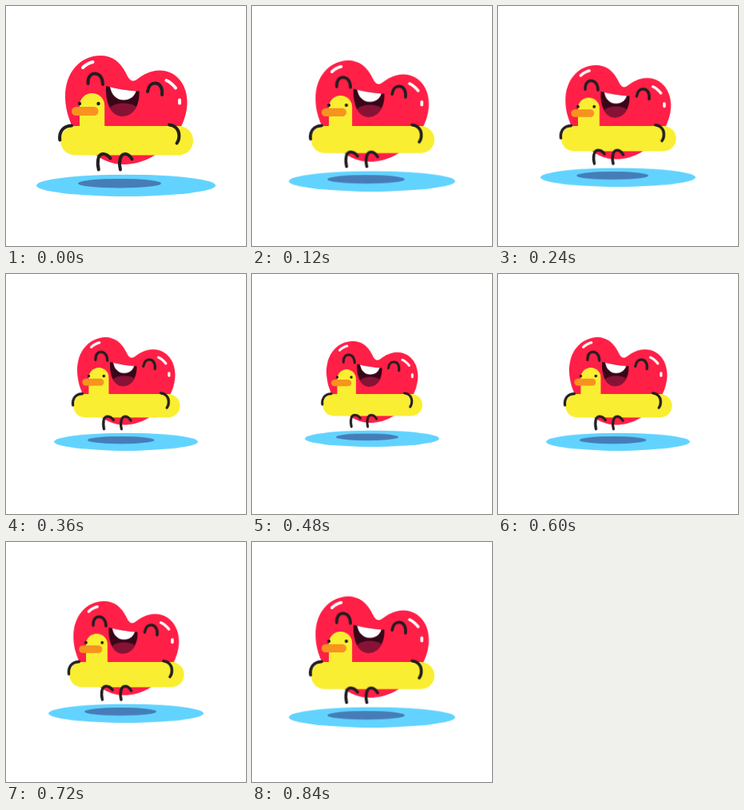
Animation, 300 px wide and 300 px high, one loop 960 ms. Source, as an HTML page without scripts:

```html
<!DOCTYPE html>
<html lang="en">
<head>
<meta charset="utf-8">
<title>Floating heart</title>
<style>
  html, body { margin: 0; width: 100%; height: 100%; overflow: hidden; background: #fff; }
  svg { display: block; width: 100%; height: 100%; }
  .line { fill: none; stroke: #231f20; stroke-width: 4; stroke-linecap: round; stroke-linejoin: round; }
  .shine { fill: none; stroke: #fff; stroke-width: 4; stroke-linecap: round; }

  /* Shrinks and grows about the stage centre in hard steps */
  .scene { transform-origin: 150px 150px; animation: pulse 960ms step-end infinite; }
  @keyframes pulse {
    0%, 100% { transform: scale(1); }
    12.5%, 87.5% { transform: scale(.929); }
    25%, 75% { transform: scale(.864); }
    37.5%, 62.5% { transform: scale(.803); }
    50% { transform: scale(.75); }
  }
</style>
</head>
<body>
<svg viewBox="0 0 300 300">
  <defs>
    <clipPath id="mouth">
      <path d="M125 100C136 103 151 106 166.500 106.500C167.500 124 159 137.500 146 137.500C131 137.500 124 121 125 100Z"/>
    </clipPath>
  </defs>
  <g class="scene">
    <g class="pool">
      <ellipse cx="150" cy="224.300" rx="112" ry="13.600" fill="#62d3ff"/>
      <ellipse cx="142" cy="221.700" rx="52" ry="5.800" fill="#467db8"/>
    </g>

    <g class="heart">
      <path fill="#ff1f47" d="M150 84C143 70 133 62 118 62C92 62 74 84 74 113C74 154 108 198 147 198C190 198 226.500 158 226.500 120C226.500 97 212 80.500 192 80.500C181 80.500 171 86 164 91.500C158 96 154 93 150 84Z"/>
      <path class="shine" d="M96 77Q101 72 108.500 70M200.500 93Q207 96 212 102.500M217 117.500V121.500"/>
      <path class="line" d="M102.500 97C102 89 106 84.500 111 84.500C117 84.500 121 90 121 98M177 107C178 100 182 96 187 96.500C193 97 196 103 195 111"/>
      <g clip-path="url(#mouth)">
        <rect x="120" y="95" width="55" height="48" fill="#3a0519"/>
        <ellipse cx="147" cy="136" rx="22" ry="14.500" fill="#861335"/>
        <path fill="#fff" d="M129.500 98C131 111 138 117.500 147 117.500C156 117.500 162 112 163.500 103Z"/>
      </g>
    </g>

    <g class="duck">
      <path fill="#faee32" d="M92 152V124.500A15.600 15.600 0 0 1 123.200 124.500V152Z"/>
      <rect x="68" y="150" width="166" height="36.500" rx="18.250" fill="#faee32"/>
      <rect x="82" y="126" width="33.500" height="11" rx="5.500" fill="#f7931e"/>
      <g fill="#231f20">
        <circle cx="92" cy="122" r="2.200"/>
        <circle cx="115.500" cy="122" r="2.200"/>
      </g>
    </g>

    <g class="line limbs">
      <path d="M67.300 167.500C66 157 71.500 150 82 149.500"/>
      <path d="M204 148.500C211 149 216 154 216.300 161C216.500 166 215.500 169 213.500 171.500"/>
      <path d="M115.800 204.500C113.500 195 115 185.500 120.500 185C125 184.500 128 187 130.500 190.500"/>
      <path d="M143 204.500C140.500 195 143 185.500 148 185C152 184.500 155 187 157.500 191.500"/>
    </g>
  </g>
</svg>
</body>
</html>
```
